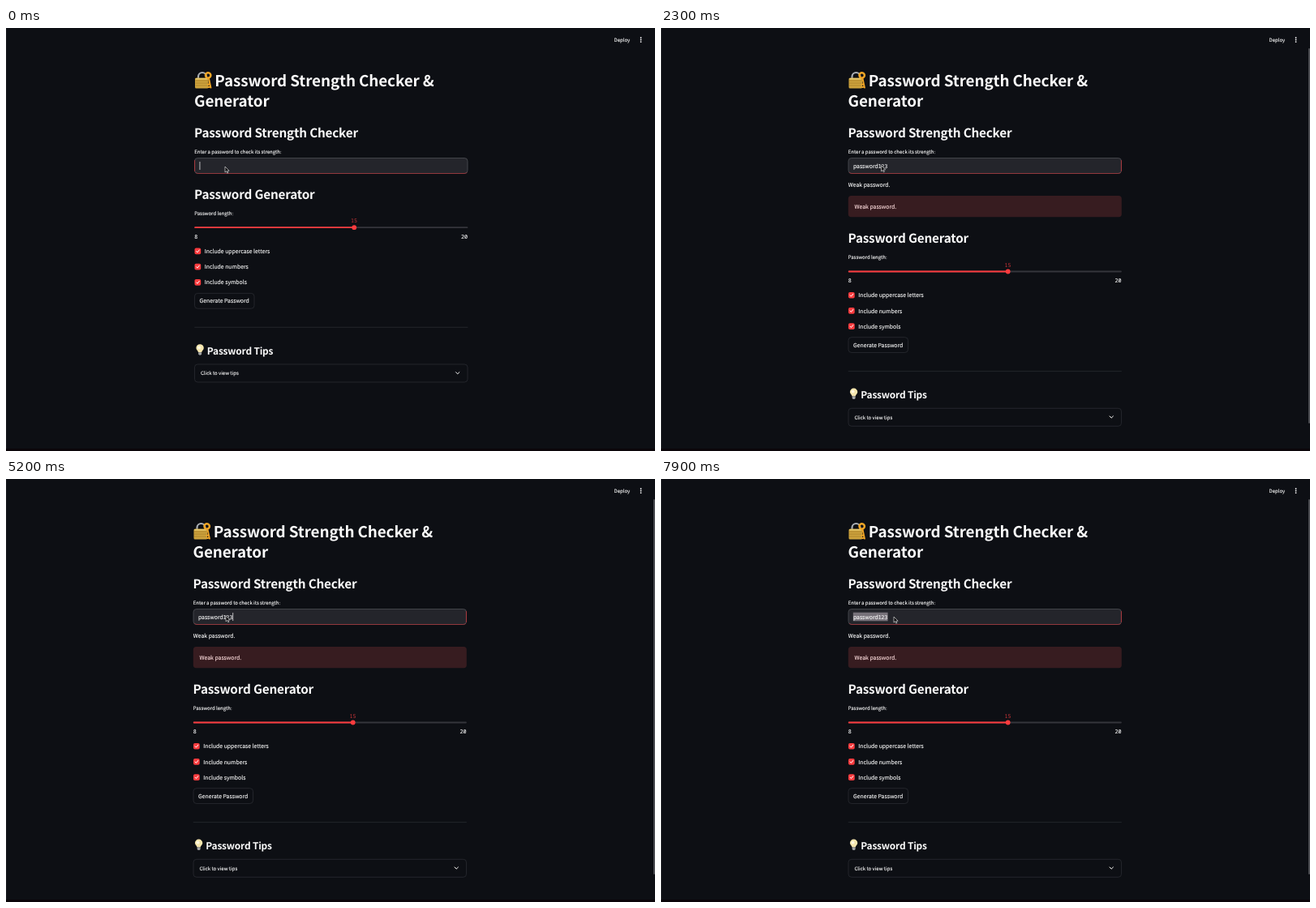
Animation, 800 px wide and 522 px high, one loop 8000 ms. Source, as an HTML page:

```html
<!DOCTYPE html>
<html lang="en">
<head>
<meta charset="utf-8">
<title>Password Strength Checker</title>
<style>
  html, body { margin: 0; width: 100%; height: 100%; overflow: hidden; background: #0d0f14; }
  svg { display: block; width: 800px; height: 522px; }
  text {
    font-family: "Noto Sans CJK SC", "Noto Sans CJK JP", "Noto Sans", sans-serif;
    font-size: 6.86px; fill: #fafafa; stroke: #fafafa; stroke-width: .12;
    text-rendering: geometricPrecision; white-space: pre;
  }
  .h1, .h2, .h3 { font-weight: 700; stroke: none; }
  .h1 { font-size: 18.85px; letter-spacing: -.1px; }
  .h2 { font-size: 15.3px; letter-spacing: -.2px; }
  .h3 { font-size: 11.9px; letter-spacing: -.18px; }
  .small { font-size: 6px; }
  .mono { font-family: "Noto Sans Mono", "DejaVu Sans Mono", monospace; font-size: 6.7px; }
  .red { fill: #fc3b3e; }
  .value { fill: #c93438; stroke: none; }
  .box { fill: none; stroke: #33353b; stroke-width: .6; }
  .line { fill: none; stroke-linecap: round; stroke-linejoin: round; }
  .alert { fill: #ffdede; stroke: #ffdede; }
</style>
</head>
<body>
<svg viewBox="0 0 800 522">
  <rect width="800" height="522" fill="#0d0f14"/>
  <rect width="1" height="522" fill="#1b1c21"/>
  <rect y="519" width="800" height="3" fill="#0b060a"/>

  <g id="status" opacity=".13">
    <g class="line" stroke="#fafafa" stroke-width="1">
      <circle cx="672.5" cy="11.5" r=".6"/>
      <path d="M669 13.5h7M672.5 13.5v2.5l-2 3M672.5 16l2 3"/>
    </g>
    <text class="small" x="683" y="17.2">RUNNING...</text>
    <text class="small" x="725" y="17.2">Stop</text>
  </g>
  <text class="small" x="749.6" y="17.1">Deploy</text>
  <g fill="#fafafa">
    <circle cx="782.6" cy="11.9" r=".9"/>
    <circle cx="782.6" cy="14.5" r=".9"/>
    <circle cx="782.6" cy="17.1" r=".9"/>
  </g>
  <rect id="scrollbar" x="798" y="25" width="2" height="463" rx="1" fill="#4c4d52"/>

  <g id="page">
    <!-- padlock and key -->
    <path class="line" d="M237 63v-3a5 5 0 0 1 10 0v3" stroke="#a9adb2" stroke-width="2.2"/>
    <rect x="233" y="61.5" width="16.5" height="13" rx="1.6" fill="#cda33d"/>
    <path d="M233.5 65h15.5M233.5 68h15.5M233.5 71h15.5" stroke="#a67d28" stroke-width=".8"/>
    <rect x="233.5" y="62" width="15.5" height="1.6" rx=".8" fill="#e8cb72"/>
    <g transform="rotate(-12 249 60)">
      <path class="line" d="M249.5 62v12M249.5 69.5h-2.6M249.5 72.8h-2.6" stroke="#f0a526" stroke-width="2"/>
      <circle cx="249.5" cy="58.5" r="3.2" fill="none" stroke="#f0a526" stroke-width="2.5"/>
    </g>

    <text class="h1" x="257.3" y="72">Password Strength Checker &amp;</text>
    <text class="h1" x="232" y="97.4">Generator</text>
    <text class="h2" x="232" y="134.8">Password Strength Checker</text>
    <text class="small" x="232.2" y="155.2">Enter a password to check its strength:</text>

    <rect x="232.5" y="160.5" width="336.5" height="19" rx="3.8" fill="#24252b" stroke="#55565c" stroke-width=".7"/>
    <path class="line" d="M234 178.5Q235 179.5 236.5 179.5H565Q567 179.5 568 178.5" stroke="#b5343a" stroke-width=".7"/>
    <path id="edge" class="line" stroke="#c9363b" stroke-width=".8"/>
    <rect id="selection" x="238.3" y="164.7" width="42.8" height="10.6" fill="#77727a"/>
    <text id="entry" x="238.4" y="172.5"></text>
    <rect id="caret" y="165" width=".7" height="10" fill="#fafafa"/>

    <g id="result">
      <text x="232.3" y="195.6">Weak password.</text>
      <rect x="232.3" y="207" width="337" height="26.3" rx="3.8" fill="#371c20"/>
      <text class="alert" x="240" y="222.8">Weak password.</text>
    </g>

    <g id="lower">
      <text class="h2" x="232" y="210.8">Password Generator</text>
      <text class="small" x="232.2" y="231.2">Password length:</text>
      <text class="mono value" x="424.9" y="240.4">15</text>
      <rect x="232.3" y="245.2" width="337" height="1.9" rx=".9" fill="#34353b"/>
      <rect class="red" x="232.3" y="245.2" width="197" height="1.9" rx=".9"/>
      <circle class="red" cx="429.2" cy="246.2" r="2.9"/>
      <text class="mono" x="232.2" y="259.5">8</text>
      <text class="mono" x="561" y="259.5">20</text>

      <g id="options"></g>

      <rect class="box" x="232.5" y="327.4" width="73.5" height="18.8" rx="3.8"/>
      <text x="269.2" y="339.4" text-anchor="middle">Generate Password</text>
      <path d="M232.3 369.3h337" stroke="#2c2e34" stroke-width=".7"/>

      <!-- light bulb -->
      <path d="M237 400.2c0-2-2.6-2.8-2.6-5.3a4.7 4.7 0 0 1 9.4 0c0 2.500-2.600 3.300-2.600 5.300z" fill="#f6e6ae"/>
      <circle cx="238" cy="394.300" r="1.900" fill="#fff9e2"/>
      <path d="M237.200 400.200h3.900v2.400q-1.950 2.400-3.900 0z" fill="#a3a4a5"/>
      <text class="h3" x="247.8" y="402.8">Password Tips</text>

      <rect class="box" x="232.5" y="415" width="336.5" height="22" rx="3.8"/>
      <text class="small" x="240" y="428.3">Click to view tips</text>
      <path class="line" d="M554.5 424.700l2.200 2.200l2.200-2.200" stroke="#fafafa" stroke-width="1"/>
    </g>
  </g>

  <path id="pointer" d="M0 0v7.100l1.700-1.500l1.100 2.500l1.100-.5l-1.100-2.400h2.300z" fill="#08080a" stroke="#e8e8e8" stroke-width=".65"/>
</svg>

<script>
const $ = id => document.getElementById(id);
const LOOP = 8000, TYPE_START = 400, KEY_GAP = 110, SUBMIT = 1700, RESULT = 1900, SELECT = 7600;
const WORD = "password123";

// Pointer stops: time, x, y
const STOPS = [
  [0, 270, 171], [2000, 270, 171], [2200, 271.5, 169.7], [2500, 271.5, 169.7],
  [2900, 271, 168.7], [5500, 271, 168.7], [6200, 321, 188.6], [6800, 321, 188.6],
  [7400, 287, 170], [LOOP, 287, 170]
];

$("options").innerHTML = ["uppercase letters", "numbers", "symbols"].map((name, i) =>
  `<g transform="translate(0 ${i * 19.2})">
    <rect class="red" x="232.500" y="271.600" width="7.700" height="7.700" rx="1.800"/>
    <path class="line" d="M234.600 275.500l1.300 1.400l2.400-3" stroke="#fff" stroke-width="1"/>
    <text x="244.800" y="278.100">Include ${name}</text>
  </g>`).join("");

const show = (id, on) => $(id).setAttribute("visibility", on ? "visible" : "hidden");
const move = (id, x, y) => $(id).setAttribute("transform", `translate(${x} ${y})`);
const ease = p => p * p * (3 - 2 * p);

function pointerAt(t) {
  const i = STOPS.findIndex(s => s[0] > t);
  const [t0, x0, y0] = STOPS[i - 1], [t1, x1, y1] = STOPS[i];
  const p = ease((t - t0) / (t1 - t0));
  return [x0 + (x1 - x0) * p, y0 + (y1 - y0) * p];
}

function draw(t) {
  const done = t >= RESULT;
  const typed = Math.max(0, Math.min(WORD.length, Math.floor((t - TYPE_START) / KEY_GAP) + 1));
  const typing = typed > 0 && typed < WORD.length;
  const selected = t >= SELECT;

  $("entry").textContent = WORD.slice(0, typed);
  const width = typed ? $("entry").getComputedTextLength() : 0;
  $("caret").setAttribute("x", 238.6 + width);
  show("caret", !selected && (typing || (t + 250) % 1000 < 500));
  show("selection", selected);

  show("status", t >= SUBMIT && !done);
  show("result", done);
  show("scrollbar", done);
  move("page", done ? -1.5 : 0, 0);
  move("lower", 0, done ? 54.3 : 0);
  $("edge").setAttribute("d", done ? "M568.900 163.500v13" : "M232.600 163.500v13");

  show("pointer", !typed || done);
  move("pointer", ...pointerAt(t));
}

function frame(now) {
  draw(now % LOOP);
  requestAnimationFrame(frame);
}
draw(0);
requestAnimationFrame(frame);
</script>
</body>
</html>
```
